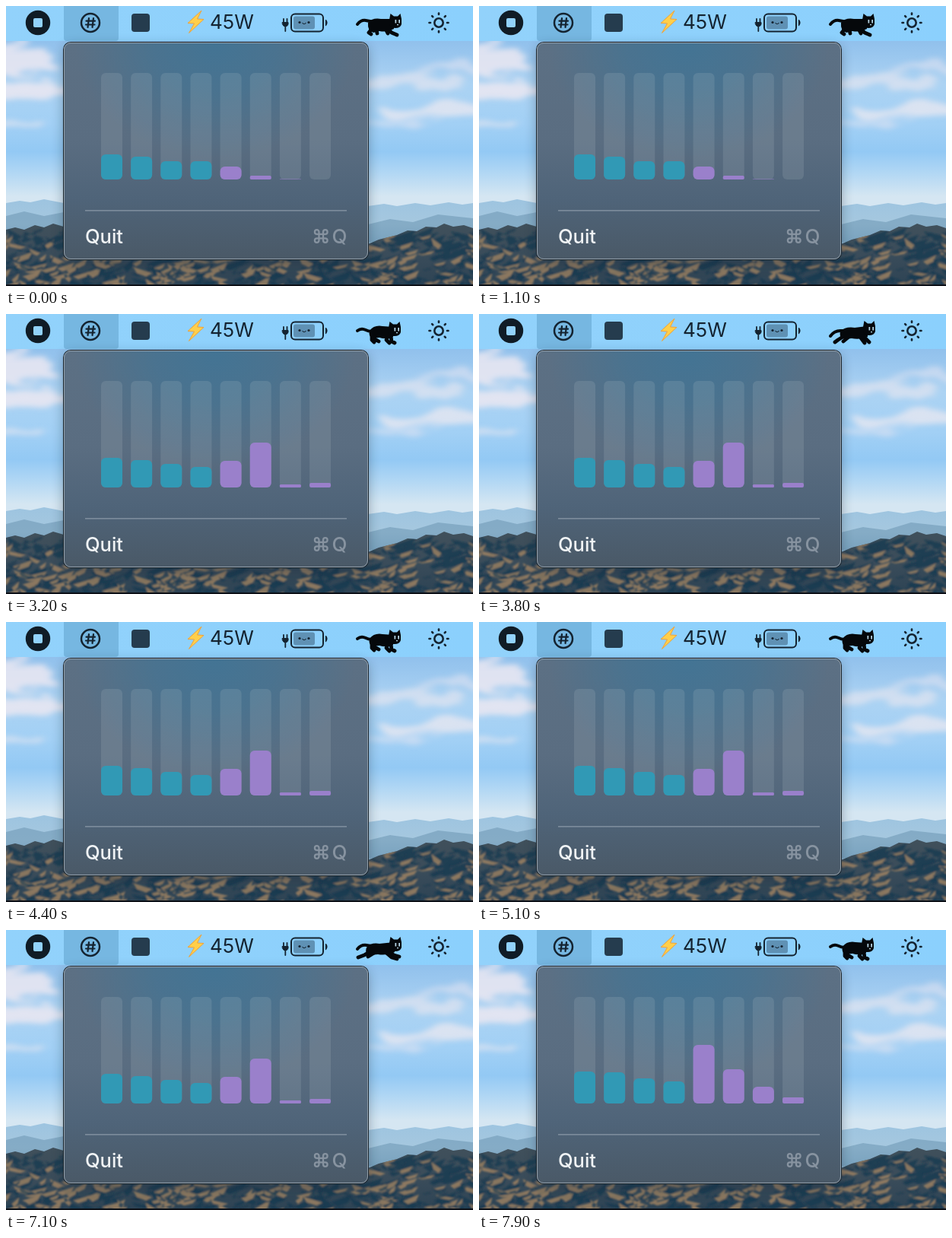
An HTML page for the animation above (8000 ms loop, 614 by 368 pixels).

```html
<!DOCTYPE html>
<html lang="en">
<head>
<meta charset="utf-8">
<title>Menu bar load meter</title>
<style>
  html, body { margin: 0; width: 100%; height: 100%; overflow: hidden; background: #8fd0fa; }
  svg { display: block; width: 614px; height: 368px; }
  text { font-family: Inter, Roboto, sans-serif; font-weight: 500; }
  .ink { fill: none; stroke: #142330; stroke-linecap: round; stroke-linejoin: round; }
  .limb { fill: none; stroke: #05080b; stroke-linecap: round; stroke-linejoin: round; }
</style>
</head>
<body>
<svg viewBox="0 0 614 368">
  <defs>
    <linearGradient id="sky" x2="0" y2="1">
      <stop offset=".12" stop-color="#90c0ec"/>
      <stop offset=".28" stop-color="#acd3f3"/>
      <stop offset=".42" stop-color="#a2d0f5"/>
      <stop offset=".52" stop-color="#93c9f4"/>
      <stop offset=".6" stop-color="#b3d8f4"/>
      <stop offset=".68" stop-color="#d5e6f2"/>
    </linearGradient>
    <linearGradient id="haze" x2="0" y2="1">
      <stop offset="0" stop-color="#9dc4e0"/>
      <stop offset=".5" stop-color="#a6c8df"/>
      <stop offset="1" stop-color="#7fa9c6"/>
    </linearGradient>
    <linearGradient id="land" x2="0" y2="1">
      <stop offset="0" stop-color="#40505b"/>
      <stop offset=".5" stop-color="#3a4c5a"/>
      <stop offset="1" stop-color="#2d4354"/>
    </linearGradient>
    <linearGradient id="glass" x2="0" y2="1">
      <stop offset="0" stop-color="#5c7084"/>
      <stop offset=".45" stop-color="#5a6d81"/>
      <stop offset=".72" stop-color="#4f6479"/>
      <stop offset="1" stop-color="#4a5967"/>
    </linearGradient>
    <radialGradient id="tint">
      <stop offset="0" stop-color="#437494"/>
      <stop offset=".45" stop-color="#437494" stop-opacity=".7"/>
      <stop offset="1" stop-color="#437494" stop-opacity="0"/>
    </radialGradient>
    <linearGradient id="bar">
      <stop offset="0" stop-color="#92d2fb"/>
      <stop offset="1" stop-color="#8bd0fd"/>
    </linearGradient>
    <filter id="cloud" x="-30%" y="-60%" width="160%" height="220%">
      <feTurbulence type="fractalNoise" baseFrequency=".018 .05" numOctaves="3" seed="4"/>
      <feDisplacementMap in="SourceGraphic" scale="34" xChannelSelector="R" yChannelSelector="G"/>
      <feGaussianBlur stdDeviation="5 3.5"/>
    </filter>
    <filter id="shade" x="-20%" y="-20%" width="140%" height="140%"><feGaussianBlur stdDeviation="8"/></filter>
    <filter id="fine"><feGaussianBlur stdDeviation="1.1"/></filter>
    <clipPath id="hill"><use href="#ridge"/></clipPath>
    <clipPath id="pane"><rect x="76" y="48" width="400" height="285" rx="9"/></clipPath>
  </defs>

  <rect width="614" height="368" fill="url(#sky)"/>
  <g filter="url(#cloud)" fill="#ebe8f1">
    <ellipse cx="20" cy="76" rx="52" ry="20" opacity=".85"/>
    <ellipse cx="40" cy="112" rx="62" ry="13" opacity=".85"/>
    <ellipse cx="10" cy="150" rx="52" ry="7" opacity=".6"/>
    <ellipse cx="525" cy="100" rx="75" ry="10" opacity=".6"/>
    <ellipse cx="590" cy="82" rx="55" ry="7" opacity=".5"/>
    <ellipse cx="570" cy="138" rx="80" ry="10" opacity=".75"/>
    <ellipse cx="505" cy="154" rx="55" ry="5" opacity=".5"/>
  </g>
  <path fill="url(#haze)" d="M0 259L18 256 32 258 50 254 76 259 300 270 476 263 497 260 514 263 538 259 558 262 582 258 600 261 614 259V320H0Z"/>
  <path fill="#7199b6" opacity=".6" d="M0 276L24 270 50 276 76 271V310H0ZM476 287L505 280 535 284 568 274 614 279V310H476Z"/>
  <path id="ridge" fill="url(#land)" d="M0 294L12 291 24 294 38 288 50 291 62 286 76 290 90 296 476 313 490 307 502 304 514 301 528 295 540 296 552 290 566 291 576 286 588 290 602 288 614 292V368H0Z"/>
  <g clip-path="url(#hill)" filter="url(#fine)">
    <path id="shadow" fill="#163850" opacity=".7"/>
    <path id="rock" fill="#aa8963" opacity=".75"/>
    <path id="brush" fill="#1b3b50" opacity=".65"/>
  </g>
  <rect y="366" width="614" height="2" fill="#0d1118"/>

  <rect width="614" height="46" fill="url(#bar)"/>
  <path d="M76 0H148V42Q148 46 144 46H80Q76 46 76 42Z" fill="#76b7e1"/>
  <circle cx="42" cy="22" r="16.2" fill="#101c26"/>
  <rect x="36" y="16" width="12" height="12" rx="2" fill="#92d2fb"/>
  <g class="ink" stroke-width="2.500">
    <circle cx="111" cy="22" r="12"/>
    <path stroke-width="2.200" d="M109 16L107.500 28M115 16L113.500 28M105.500 19.700H117M105 24.500H116.500"/>
  </g>
  <rect x="165" y="10" width="24" height="24" rx="4" fill="#253c4e"/>
  <path d="M257 6L239 22.500 247.500 23 240.500 35.500 260 17.500 251.500 17Z" fill="#ffcf4a" stroke="#f0a13a" stroke-width="1" stroke-linejoin="round"/>
  <text x="268" y="30" font-size="26" style="font-weight:400" fill="#142330">45W</text>

  <rect x="378" y="13.500" width="28" height="17" rx="3" fill="#5f91b4"/>
  <g class="ink" stroke-width="2">
    <rect x="375" y="10.500" width="42" height="23" rx="5"/>
    <path d="M420.500 18.500Q423.500 22 420.500 25.500Z" fill="#142330" stroke-width="1.2"/>
    <path d="M365 17V21M369.500 17V21M367.300 27V33" stroke-width="1.8"/>
    <path d="M363.500 21.500H371V24Q370 27 367.300 27T363.500 24Z" fill="#142330" stroke-width="1"/>
    <path d="M390 22.500Q392 25 394 22.500" stroke-width="1.2"/>
  </g>
  <circle cx="386" cy="21.500" r="1.6" fill="#142330"/>
  <circle cx="398" cy="21.500" r="1.6" fill="#142330"/>

  <path id="tail" class="limb" stroke-width="4"/>
  <path id="legs" class="limb" stroke-width="4.800"/>
  <path id="body" fill="#05080b"/>
  <g id="head">
    <path fill="#05080b" d="M-8-2L-6.500-10-2-6.500H3L6.500-10 8-3V4Q6.500 9 0 9T-8 4Z"/>
    <path fill="#b9d8e8" d="M-.5-2H1.200V2.500H-.5ZM4.300-2H6V2.500H4.300ZM2 4H4V5.200H2Z"/>
  </g>

  <g class="ink" stroke-width="2.600">
    <circle cx="569" cy="22" r="5.700"/>
    <g id="rays"></g>
  </g>

  <rect x="76" y="53" width="400" height="286" rx="10" fill="#152838" opacity=".38" filter="url(#shade)"/>
  <rect x="75" y="47" width="402" height="287" rx="10" fill="#18232c"/>
  <g clip-path="url(#pane)">
    <rect x="76" y="48" width="400" height="285" fill="url(#glass)"/>
    <ellipse cx="275" cy="50" rx="185" ry="150" fill="url(#tint)"/>
  </g>
  <rect x="76.500" y="48.500" width="399" height="284" rx="8.500" fill="none" stroke="#95a2ad"/>
  <g id="meters"></g>
  <rect x="104" y="268" width="344" height="1.700" fill="#7b8b9a"/>
  <text x="104" y="312" font-size="25.500" fill="#f0f3f5">Quit</text>
  <path fill="none" stroke="#8793a0" stroke-width="2.300" d="M411.500 299.800H417V305.300H411.500ZM411.500 299.800H408.700A2.800 2.800 0 1 1 411.500 297ZM417 299.800V297A2.800 2.800 0 1 1 419.800 299.800ZM417 305.300H419.800A2.800 2.800 0 1 1 417 308.100ZM411.500 305.300V308.100A2.800 2.800 0 1 1 408.700 305.300Z"/>
  <text x="428.500" y="312" font-size="26" fill="#8793a0">Q</text>
</svg>

<script>
const LOOP = 8000, STEP = 100;
const $ = id => document.getElementById(id);

function add(parent, tag, attrs) {
  const el = document.createElementNS("http://www.w3.org/2000/svg", tag);
  set(el, attrs);
  return parent.appendChild(el);
}
function set(el, attrs) {
  for (const key in attrs) el.setAttribute(key, attrs[key]);
}

// Rugged slopes: long slanted facets from a seeded generator
let seed = 17;
const rnd = () => (seed = seed * 16807 % 2147483647) / 2147483647;
function facets(count, top, size) {
  let d = "";
  for (let i = 0; i < count; i++) {
    const x = rnd() * 640 - 10, y = top + rnd() * (368 - top);
    const w = size * (.5 + rnd()), h = size * (.2 + rnd() * .35);
    const lean = rnd() < .7 ? -1 : 1;
    d += `M${x} ${y}l${lean * w} ${h}l${-lean * w * .3} ${h * .5}l${-lean * w * .5} ${-h * .5}Z`;
  }
  return d;
}
set($("shadow"), { d: facets(200, 290, 24) });
set($("rock"), { d: facets(190, 300, 18) });
set($("brush"), { d: facets(150, 292, 11) });

for (let i = 0; i < 8; i++) {
  add($("rays"), "path", { d: "M569 11V9.500", transform: `rotate(${i * 45} 569 22)` });
}

// Core loads, refreshed every five seconds; rate is cat poses per second
const phases = [
  { from: 0, rate: 13.64, load: [33, 30, 24, 24, 17, 5, 1, 0] },
  { from: 2500, rate: 20.95, load: [39, 36, 31, 27, 35, 59, 4, 6] },
  { from: 7500, rate: 25, load: [42, 41, 33, 29, 77, 45, 22, 8] }
];

const bars = phases[0].load.map((_, i) => {
  const x = 125 + i * 39.15;
  add($("meters"), "rect", { x, y: 88, width: 28, height: 140, rx: 6, fill: "#b8c4ce", "fill-opacity": .16 });
  return add($("meters"), "rect", { x, width: 28, fill: i < 4 ? "#3199b5" : "#9a80cb" });
});

// One running stride, in order
const poses = [
  { tail: "M462 24Q467 18 473 19T483 21", head: [512, 20],
    body: "M476 22Q482 15 493 17L510 17V30Q501 35 491 33L483 35Q475 33 476 22Z",
    legs: "M481 30L477 35 480 37M487 31L488 36M502 30L507 35 514 38M499 30L502 36" },
  { tail: "M462 25Q467 19 474 20T483 21", head: [512, 19],
    body: "M474 23Q480 16 491 18L511 16V29Q500 34 489 32L479 33Q471 32 474 23Z",
    legs: "M479 28L471 33 463 36M484 30L476 35M504 29L510 33 517 35M500 30L507 36 514 38" },
  { tail: "M462 29Q467 22 475 22T483 21", head: [513, 19],
    body: "M475 23Q482 16 494 18L511 16V30Q501 34 490 32L481 33Q473 32 475 23Z",
    legs: "M480 29L472 34 468 37M485 31L479 36M505 29L513 37M501 30L507 38" },
  { tail: "M462 24Q468 18 475 20T484 21", head: [512, 20],
    body: "M477 23Q483 15 495 17L510 18V31Q501 34 491 32L483 34Q475 31 477 23Z",
    legs: "M482 30L481 36M487 30L490 36M504 30L506 38M499 30L498 36" },
  { tail: "M462 22Q467 18 473 21T484 22", head: [511, 20],
    body: "M478 22Q484 14 495 16L509 17V30Q500 34 491 31L483 32Q476 30 478 22Z",
    legs: "M482 28L485 33 490 36M481 28L481 34 484 37M502 30L500 34 504 38M506 29L507 36 511 38" }
];

function poseAt(t) {
  let ticks = .735;
  phases.forEach((p, i) => {
    const end = i + 1 < phases.length ? phases[i + 1].from : LOOP;
    ticks += Math.max(0, Math.min(t, end) - p.from) * p.rate / 1000;
  });
  return poses[Math.floor(ticks) % poses.length];
}

function draw(t) {
  const { load } = phases.filter(p => p.from <= t).pop();
  bars.forEach((bar, i) => {
    const h = load[i];
    set(bar, { y: 228 - h, height: h, rx: h < 12 ? Math.min(2, h / 3) : 6, opacity: h > 1 ? 1 : .5 });
  });
  const pose = poseAt(t);
  for (const part of ["tail", "body", "legs"]) set($(part), { d: pose[part] });
  set($("head"), { transform: `translate(${pose.head})` });
}

const start = performance.now();
let shown = -1;
function frame() {
  const now = Math.max(0, performance.now() - start);
  const t = Math.floor((now % LOOP) / STEP) * STEP;
  if (t !== shown) draw(shown = t);
  requestAnimationFrame(frame);
}
frame();
</script>
</body>
</html>
```
